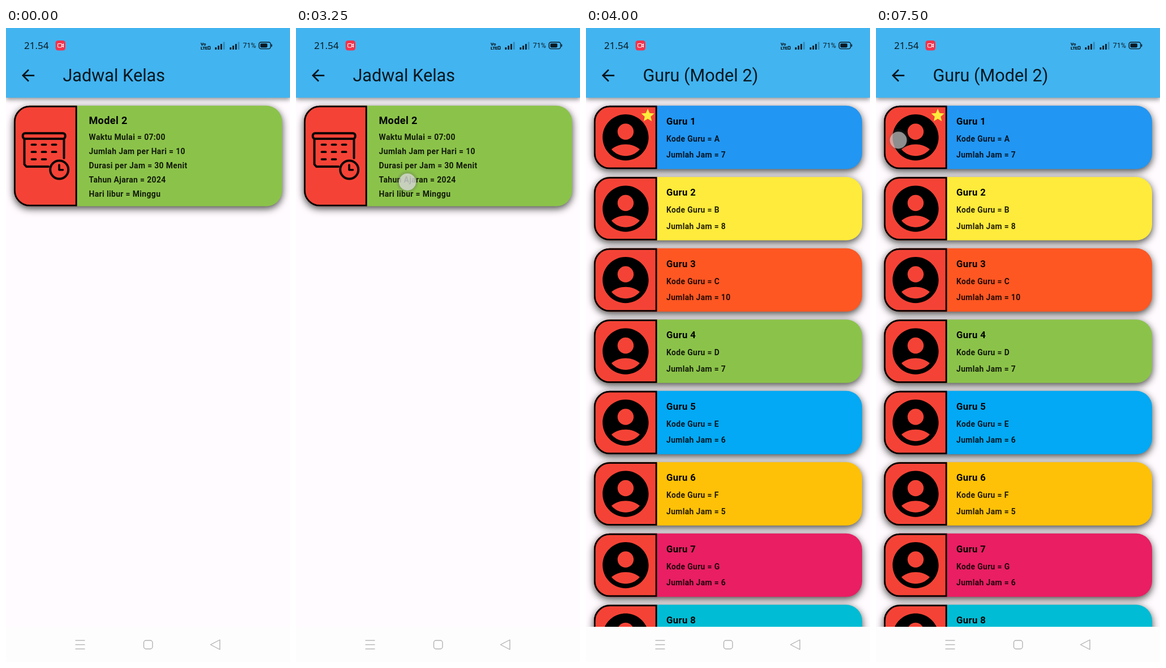
Recreate the animation shown at these times as an HTML page with a canvas. Size 502 px wide and 1116 px high, loop 7.58 s.

```html
<!DOCTYPE html>
<html lang="id">
<head>
<meta charset="utf-8">
<title>Jadwal Kelas</title>
<style>
  html, body { margin: 0; width: 100%; height: 100%; overflow: hidden; background: #fffbfe; }
  canvas { display: block; width: 502px; height: 1116px; }
</style>
</head>
<body>
<canvas id="stage"></canvas>
<script>
const W = 502, H = 1116, LOOP = 7580, NAV_TOP = 1054;
const DP = W / 360; // pixels per layout unit
const canvas = document.getElementById('stage');
const ctx = canvas.getContext('2d');
const dpr = window.devicePixelRatio || 1;
canvas.width = W * dpr;
canvas.height = H * dpr;

const ICONS = {
  back: new Path2D('M20 11H7.83l5.59-5.59L12 4l-8 8 8 8 1.41-1.41L7.83 13H20v-2z'),
  star: new Path2D('M12 17.27L18.18 21l-1.64-7.03L22 9.24l-7.19-.61L12 2 9.19 8.63 2 9.24l5.46 4.73L5.82 21z'),
  person: new Path2D('M12 2C6.48 2 2 6.48 2 12s4.48 10 10 10 10-4.48 10-10S17.52 2 12 2z' +
    'm0 4c1.93 0 3.5 1.57 3.5 3.5S13.93 13 12 13s-3.5-1.57-3.5-3.5S10.07 6 12 6z' +
    'm0 14c-2.03 0-4.43-.82-6.14-2.88C7.55 15.8 9.68 15 12 15s4.45.8 6.14 2.12C16.43 19.18 14.03 20 12 20z')
};
const INK = 'rgba(0,0,0,.87)';
const TEACHERS = [
  ['#2196f3', 7], ['#ffeb3b', 8], ['#ff5722', 10], ['#8bc34a', 7],
  ['#03a9f4', 6], ['#ffc107', 5], ['#e91e63', 6], ['#00bcd4', 7]
];

function text(str, x, y, size, color = INK, weight = 400, spacing = 0, family = 'Roboto') {
  ctx.font = `${weight} ${size}px ${family}, sans-serif`;
  ctx.letterSpacing = spacing + 'px';
  ctx.fillStyle = color;
  ctx.fillText(str, x, y);
}

const bodyText = (str, x, y, sp = 10, color = INK) =>
  text(str, x, y, sp * DP, color, 700, 0.25 * DP);

function icon(name, x, y, size, color) {
  ctx.save();
  ctx.translate(x, y);
  ctx.scale(size / 24, size / 24);
  ctx.fillStyle = color;
  ctx.fill(ICONS[name], 'evenodd');
  ctx.restore();
}

function box(x, y, w, h, r, color) {
  ctx.beginPath();
  ctx.roundRect(x, y, w, h, r);
  ctx.fillStyle = color;
  ctx.fill();
}

function outline(x, y, w, h, r, color, width) {
  ctx.beginPath();
  ctx.roundRect(x, y, w, h, r);
  ctx.strokeStyle = color;
  ctx.lineWidth = width;
  ctx.stroke();
}

function line(color, width, ...points) {
  ctx.beginPath();
  points.forEach(([x, y]) => ctx.lineTo(x, y));
  ctx.strokeStyle = color;
  ctx.lineWidth = width;
  ctx.stroke();
}

function shadow(color, blur, dy) {
  ctx.shadowColor = color;
  ctx.shadowBlur = blur * dpr;
  ctx.shadowOffsetY = dy * dpr;
}

// Rounded card with the bordered red panel on its left side
function card(y, h, color) {
  const x = 14, r = 20 * DP, b = 2 * DP;
  ctx.save();
  shadow('rgba(0,0,0,.74)', 14, 4);
  box(x, y, 474, h, r, color);
  ctx.restore();
  box(x, y, 80 * DP, h, [r, 0, 0, r], '#f44336');
  outline(x + b / 2, y + b / 2, 80 * DP - b, h - b, [r - b / 2, 0, 0, r - b / 2], '#000', b);
}

function calendar() {
  const k = '#0a0505';
  ctx.save();
  ctx.lineCap = ctx.lineJoin = 'round';
  outline(29.7, 185.3, 75, 9.6, 4, k, 4);
  line(k, 4, [32.5, 196], [32.5, 240], [36, 244], [75, 244]);
  line(k, 4, [102.5, 196], [102.5, 229]);
  for (let i = 0; i < 8; i++) {
    const x = 45.5 + (i % 3) * 18, y = 205.3 + Math.floor(i / 3) * 12.9;
    line(k, 3.8, [x, y], [x + 7, y]);
  }
  ctx.beginPath();
  ctx.arc(94.2, 249.5, 16, 0, 7);
  ctx.lineWidth = 4;
  ctx.stroke();
  line(k, 3.6, [94, 241], [94, 249.7], [100.5, 249.7]);
  ctx.restore();
}

function appBar(title) {
  ctx.save();
  shadow('rgba(0,0,0,.42)', 8, 3);
  ctx.fillStyle = '#42b4f0';
  ctx.fillRect(0, 0, W, 122.7);
  ctx.restore();
  icon('back', 22.3, 66.8, 24 * DP, INK);
  text(title, 72 * DP, 93.6, 22 * DP);
}

function paper() {
  ctx.fillStyle = '#fffbfe';
  ctx.fillRect(0, 0, W, NAV_TOP);
}

function schedulePage() {
  paper();
  card(136.8, 177, '#8bc34a');
  calendar();
  bodyText('Model 2', 146.4, 168.8, 13, '#000');
  ['Waktu Mulai = 07:00', 'Jumlah Jam per Hari = 10', 'Durasi per Jam = 30 Menit',
    'Tahun Ajaran = 2024', 'Hari libur = Minggu']
    .forEach((s, i) => bodyText(s, 146.6, 196.6 + i * 25.2));
  appBar('Jadwal Kelas');
}

function teacherPage() {
  paper();
  TEACHERS.forEach(([color, hours], i) => {
    const y = 136.8 + i * 90 * DP;
    card(y, 80 * DP, color);
    icon('person', 21.2, y + 7, 70 * DP, '#000');
    if (!i) icon('star', 95.2, y + 2.9, 20 * DP, '#ffeb3b');
    bodyText('Guru ' + (i + 1), 142, y + 32.7, 12, '#000');
    bodyText('Kode Guru = ' + 'ABCDEFGH'[i], 142, y + 63);
    bodyText('Jumlah Jam = ' + hours, 142, y + 91.6);
  });
  appBar('Guru (Model 2)');
}

function statusBar() {
  const k = '#0d1a22';
  text('21.54', 32, 36.8, 17, k, 400, 0, '"Noto Sans"');

  box(87.5, 22, 17.5, 17.5, 4.5, '#f5334c');
  outline(91.5, 27.5, 7, 6.5, 1.5, '#fff', 1.1);
  line('#fff', 1.1, [98.5, 30], [101.5, 28.3], [101.5, 33.2], [98.5, 31.5]);

  text('Vo', 344, 30.5, 8, k, 900);
  text('LTE', 344, 38, 8, k, 900, -0.4);
  outline(357.2, 32.4, 3.6, 5, 0.5, k, 1.4);

  for (const x of [369.5, 395.5]) {
    [4, 7, 10, 13.5].forEach((h, i) =>
      box(x + i * 4.8, 38 - h, 2.8, h, 0.6, i < 3 ? k : 'rgba(13,26,34,.28)'));
  }

  text('71%', 418.8, 35.3, 12.5, k);
  outline(447.2, 25, 20.6, 11.6, 3.5, k, 1.4);
  box(449.5, 27.2, 12.5, 7.2, 1.8, k);
  box(468.8, 28.6, 1.6, 4.4, 0.8, k);
}

function navBar() {
  const k = '#b3b3b3';
  ctx.fillStyle = '#fdfdfd';
  ctx.fillRect(0, NAV_TOP, W, H - NAV_TOP);
  for (const y of [1078, 1085.5, 1093]) line(k, 1.4, [122.5, y], [139.5, y]);
  outline(243.5, 1078, 15.5, 15, 4, k, 1.4);
  ctx.save();
  ctx.lineJoin = 'round';
  line(k, 1.4, [361.5, 1085.5], [378, 1077], [378, 1094], [361.5, 1085.5], [370, 1081]);
  ctx.restore();
}

function touch(x, y, alpha) {
  ctx.save();
  ctx.globalAlpha = alpha;
  const halo = ctx.createRadialGradient(x, y, 13, x, y, 21);
  halo.addColorStop(0, 'rgba(90,90,90,.38)');
  halo.addColorStop(1, 'rgba(90,90,90,0)');
  ctx.beginPath();
  ctx.arc(x, y, 21, 0, 7);
  ctx.fillStyle = halo;
  ctx.fill();
  ctx.beginPath();
  ctx.arc(x, y, 15, 0, 7);
  ctx.fillStyle = 'rgba(228,228,228,.72)';
  ctx.fill();
  ctx.restore();
}

// A tap fades out in four held steps
function tap(t, start, x, y, slide = 0) {
  const step = Math.floor((t - start + 8) / 84);
  if (t < start || step > 3) return;
  touch(x + slide * Math.min(1, step / 2), y, [1, 0.85, 0.55, 0.22][step]);
}

function draw(t) {
  ctx.setTransform(dpr, 0, 0, dpr, 0, 0);
  if (t < 3580) {
    schedulePage();
  } else {
    // The new page lands slightly small, then settles
    const scale = t < 3670 ? 0.9988 : 1;
    ctx.fillStyle = '#1c2a30';
    ctx.fillRect(0, 0, W, NAV_TOP);
    ctx.save();
    ctx.translate(W / 2, NAV_TOP / 2);
    ctx.scale(scale, scale);
    ctx.translate(-W / 2, -NAV_TOP / 2);
    ctx.beginPath();
    ctx.rect(0, 0, W, NAV_TOP);
    ctx.clip();
    teacherPage();
    ctx.restore();
  }
  statusBar();
  navBar();
  tap(t, 3250, 197, 271);
  tap(t, 6580, 36, 207.5, 32);
  if (t >= 7330) touch(39.5, 197.5, 0.8);
}

const begin = performance.now();
function tick() {
  draw((performance.now() - begin) % LOOP);
  requestAnimationFrame(tick);
}
tick();
</script>
</body>
</html>
```
